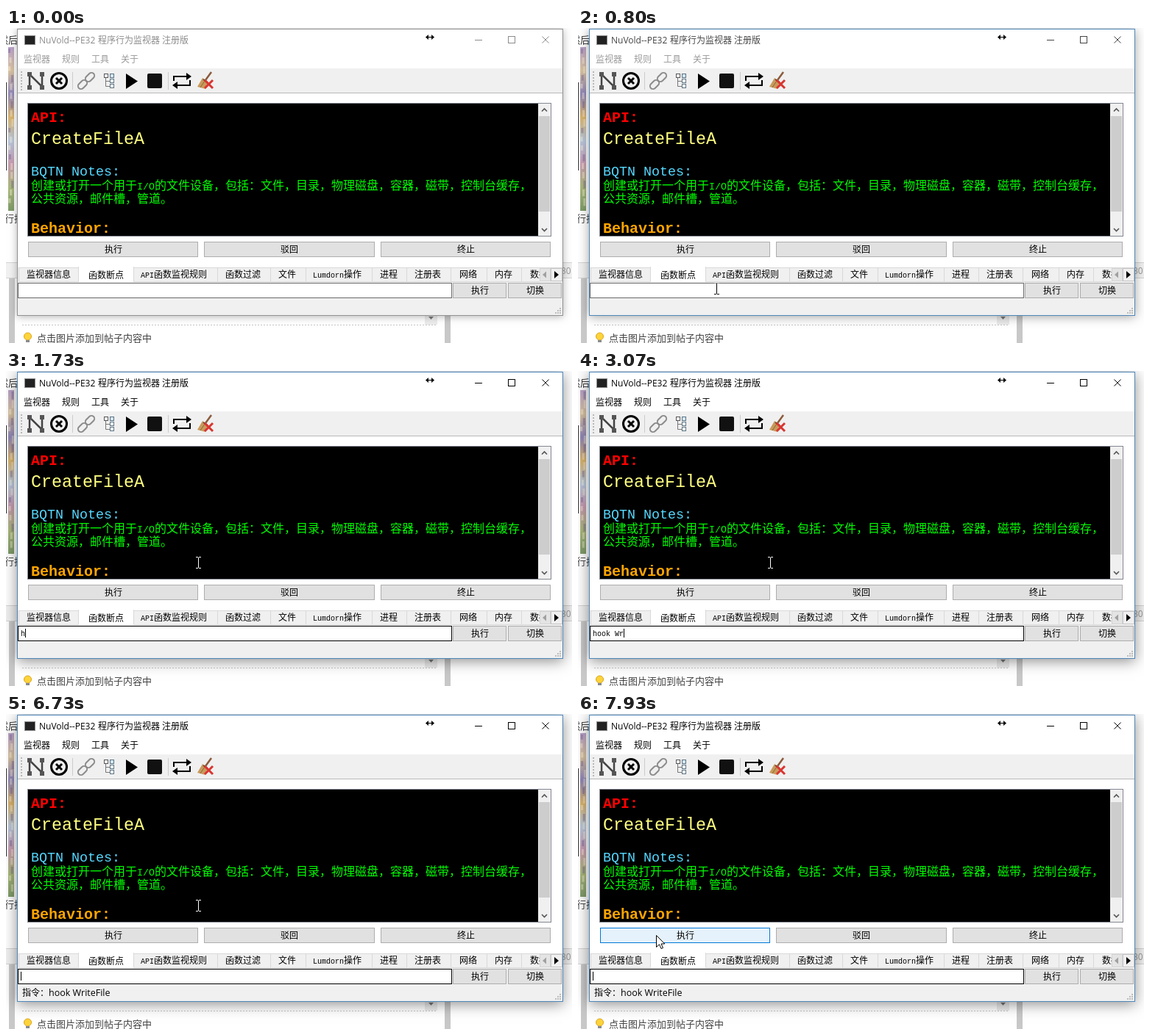
These frames come from a looping animation (769 px wide and 429 px high, 8000 ms). An HTML page with a canvas:

```html
<!DOCTYPE html>
<html lang="zh-CN">
<head>
<meta charset="utf-8">
<style>
html, body { margin: 0; width: 100%; height: 100%; overflow: hidden; background: #fff; }
canvas { display: block; }
</style>
</head>
<body>
<canvas id="stage" width="769" height="429"></canvas>
<script>
const ctx = document.getElementById('stage').getContext('2d');
const LOOP = 8000, STEP = 200 / 3;
const CJK = '"Noto Sans CJK SC", "Noto Sans CJK", sans-serif';
const UI = '"Open Sans", "Noto Sans CJK SC", "Noto Sans CJK", sans-serif';
const MONO = '"Liberation Mono", monospace';

const COMMAND = 'hook WriteFile';
const KEY_TIMES = [1730, 2000, 2130, 2330, 2470, 2870, 3070, 3800, 4070, 4200, 4670, 4870, 5130, 5330];
const ENTER = 5930;
const CARET_OFF = [[0, 1000], [1470, 1730], [3670, 3800], [5930, 6470], [7000, 7530]];
const PICTURE_CHANGES = [670, 800, 930, 4670, 4730, 4800, 6530, 6600, 6670, 7330, 7470, 7600, 7730];

const clamp = v => Math.max(0, Math.min(1, v));
const lerp = (a, b, p) => a + (b - a) * p;
const ease = p => p * p * (3 - 2 * p);
const grey = v => `rgb(${v},${v},${v})`;

function rect(x, y, w, h, color) {
  ctx.fillStyle = color;
  ctx.fillRect(x, y, w, h);
}

function box(x, y, w, h, fill, border) {
  rect(x, y, w, h, border);
  rect(x + 1, y + 1, w - 2, h - 2, fill);
}

function shape(points, fill) {
  ctx.beginPath();
  points.forEach(([x, y]) => ctx.lineTo(x, y));
  ctx.closePath();
  ctx.fillStyle = fill;
  ctx.fill();
}

function line(points, color, width = 1) {
  ctx.beginPath();
  points.forEach(([x, y], i) => i ? ctx.lineTo(x, y) : ctx.moveTo(x, y));
  ctx.strokeStyle = color;
  ctx.lineWidth = width;
  ctx.stroke();
}

function text(s, x, y, color, font = '12px ' + UI) {
  ctx.font = font;
  ctx.fillStyle = color;
  ctx.fillText(s, x, y);
}

// Half-width Latin takes one cell, full-width characters take two.
function cells(s, x, y, cell, color, weight = '') {
  for (const run of s.match(/[\x20-\x7e]+|[^\x20-\x7e]+/g) || []) {
    const latin = run.charCodeAt(0) < 127;
    text(run, x, y, color, `${weight} ${latin ? cell / 0.6 : cell * 2}px ${latin ? MONO : CJK}`);
    x += ctx.measureText(run).width;
  }
}

function button(label, x, y, w, h, hover) {
  box(x, y, w, h, hover ? '#e5f1fb' : '#e1e1e1', hover ? '#0078d7' : '#adadad');
  cells(label, Math.round(x + w / 2 - 12), y + h / 2 + 4.5, 6, '#000');
}

function picture(t) {
  const phase = PICTURE_CHANGES.filter(k => t >= k).length;
  const tones = ['#b9a2c8', '#d8c2a0', '#8f86b8', '#d9b36c', '#b7c7dc', '#c79bb0', '#a9b77a', '#7d9a68'];
  const g = ctx.createLinearGradient(0, 26, 0, 249);
  tones.forEach((c, i) => g.addColorStop(i / 7, c));
  rect(3, 26, 8, 223, g);
  ctx.globalAlpha = 0.4;
  for (let i = 0; i < 18; i++) {
    const r = Math.abs(Math.sin(i * 12.9 + phase * 0.35) * 43.7) % 1;
    rect(3 + r * 5, 28 + i * 12, 3, 6 + r * 5, i % 3 ? '#fff4dc' : '#6d5a95');
  }
  ctx.globalAlpha = 1;
  rect(0, 74, 1, 120, '#333');
}

function page(t) {
  rect(0, 0, 769, 429, '#fff');
  text('然后', -10, 21, '#333', '13px ' + CJK);
  picture(t);
  text('行执', -2, 264, '#444', '13px ' + CJK);
  box(-1, 319, 771, 22, '#f1f1f1', '#d4d4d4');
  text('30', 754, 335, '#999', '12px ' + UI);
  rect(4, 341, 600, 88, '#c8c8c8');
  rect(12, 341, 584, 88, '#fff');
  rect(569, 380, 17, 24, '#ececec');
  shape([[574, 393], [581, 393], [577.5, 397]], '#777');
  for (let x = 22; x < 586; x += 4) rect(x, 404, 2, 1, '#c4c4c4');
  ctx.beginPath();
  ctx.arc(29.5, 420, 5, 0, 7);
  ctx.fillStyle = '#ffd43a';
  ctx.fill();
  ctx.strokeStyle = '#d9a520';
  ctx.lineWidth = 1;
  ctx.stroke();
  rect(27, 425, 5, 3, '#8a8a8a');
  text('点击图片添加到帖子内容中', 42, 427, '#444', '13px ' + CJK);
}

function frame(active) {
  ctx.save();
  ctx.shadowColor = `rgba(0,0,0,${lerp(0.3, 0.45, active)})`;
  ctx.shadowBlur = lerp(10, 18, active);
  ctx.shadowOffsetY = lerp(1, 3, active);
  rect(15, 1, 742, 391, active > 0.5 ? '#4f86b8' : '#929292');
  ctx.restore();
  rect(16, 2, 740, 389, '#fff');
}

function titleBar(t, active) {
  const ink = grey(Math.round(lerp(140, 0, active)));
  box(25, 10, 15, 13, '#222', '#8a8a8a');
  text('NuVold--PE32', 45, 21, ink);
  text('程序行为监视器', 125, 21, ink, '12px ' + CJK);
  text('注册版', 212, 21, ink, '12px ' + CJK);
  rect(637, 16, 10, 1, ink);
  box(682, 11, 10, 10, '#fff', ink);
  line([[728.5, 11.5], [737.5, 20.5]], ink);
  line([[737.5, 11.5], [728.5, 20.5]], ink);

  rect(572, 12, 8, 1, '#000');
  shape([[570, 12.5], [574, 9], [574, 16]], '#000');
  shape([[582, 12.5], [578, 9], [578, 16]], '#000');

  const menuInk = t >= 1000 ? '#000' : '#999';
  [['监视器', 24], ['规则', 76], ['工具', 116], ['关于', 156]]
    .forEach(([s, x]) => text(s, x, 47, menuInk, '12px ' + CJK));
}

function toolBar() {
  rect(16, 55, 740, 34, '#f0f0f0');
  rect(16, 88, 740, 1, '#b8b8b8');
  for (let y = 59; y < 86; y += 4) rect(20, y, 2, 2, '#b8b8b8');
  rect(90, 60, 1, 24, '#ccc');
  rect(220, 60, 1, 24, '#ccc');

  line([[32, 80], [32, 63], [49, 80], [49, 63]], '#444', 2.5);
  [[29, 60], [29, 78], [46, 60], [46, 78]].forEach(([x, y]) => rect(x, y, 6, 6, '#555'));

  ctx.beginPath();
  ctx.arc(72, 72, 10.5, 0, 7);
  ctx.strokeStyle = '#000';
  ctx.lineWidth = 3;
  ctx.stroke();
  line([[68, 68], [76, 76]], '#000', 3);
  line([[76, 68], [68, 76]], '#000', 3);

  for (const d of [-5, 5]) {
    ctx.save();
    ctx.translate(109 + d, 72 - d);
    ctx.rotate(-Math.PI / 4);
    ctx.beginPath();
    ctx.roundRect(-7, -4, 14, 8, 4);
    ctx.strokeStyle = '#8c8c8c';
    ctx.lineWidth = 2;
    ctx.stroke();
    ctx.restore();
  }

  box(133, 62, 6, 6, '#fff', '#555');
  [62, 69, 76].forEach(y => box(141, y, 6, 6, y > 62 ? '#fff' : '#d5e8f5', '#5b7384'));
  line([[135.5, 68], [135.5, 79.5], [141, 79.5]], '#777');
  line([[135.5, 72.5], [141, 72.5]], '#777');

  shape([[163, 62], [179, 72.5], [163, 83]], '#000');
  ctx.beginPath();
  ctx.roundRect(192, 62, 20, 20, 2);
  ctx.fillStyle = '#111';
  ctx.fill();

  line([[228, 72], [228, 66], [246, 66]], '#000', 2);
  shape([[245, 61], [252, 66], [245, 71]], '#000');
  line([[250, 71], [250, 78], [232, 78]], '#000', 2);
  shape([[233, 73], [226, 78], [233, 83]], '#000');

  line([[279, 60], [271, 71]], '#8b5a3c', 2.5);
  shape([[267, 68], [274, 73], [271, 83], [260, 80]], '#c99a5b');
  line([[264, 81], [270, 72]], '#8a6538');
  line([[268, 70], [274, 74]], '#65473a', 2);
  line([[270, 71], [281, 82]], '#d93530', 3);
  line([[281, 71], [270, 82]], '#d93530', 3);
}

function notes() {
  box(29, 102, 712, 182, '#000', '#828790');
  ctx.save();
  ctx.beginPath();
  ctx.rect(30, 103, 693, 180);
  ctx.clip();
  cells('API:', 34, 128, 12, '#f00', 'bold');
  cells('CreateFileA', 34, 158, 14, '#ffff80');
  cells('BQTN Notes:', 34, 201, 11, '#55d8ff');
  cells('创建或打开一个用于I/O的文件设备，包括：文件，目录，物理磁盘，容器，磁带，控制台缓存，', 34, 220, 8, '#0f0');
  cells('公共资源，邮件槽，管道。', 34, 238, 8, '#0f0');
  cells('Behavior:', 34, 279, 12, '#ffa500', 'bold');
  ctx.restore();
  rect(723, 103, 17, 180, '#f0f0f0');
  rect(724, 120, 15, 130, '#cdcdcd');
  line([[728, 113.5], [731.5, 110], [735, 113.5]], '#555', 1.6);
  line([[728, 273], [731.5, 276.5], [735, 273]], '#555', 1.6);
}

function tabs() {
  rect(16, 326, 740, 65, '#f0f0f0');
  rect(17, 326, 739, 1, '#d9d9d9');
  rect(17, 345, 708, 1, '#d9d9d9');
  [17, 287, 359, 407, 497, 544, 604, 653, 700].forEach(x => rect(x, 327, 1, 18, '#d9d9d9'));
  rect(98, 325, 76, 21, '#d9d9d9');
  rect(99, 325, 74, 21, '#fff');
  ctx.save();
  ctx.beginPath();
  ctx.rect(16, 325, 709, 22);
  ctx.clip();
  [['监视器信息', 28], ['API函数监视规则', 183], ['函数过滤', 298], ['文件', 370],
   ['Lumdorn操作', 417], ['进程', 508], ['注册表', 555], ['网络', 616], ['内存', 664], ['数据', 712]]
    .forEach(([s, x]) => cells(s, x, 340, 6, '#000'));
  cells('函数断点', 112, 341, 6, '#000');
  ctx.restore();
  box(725, 327, 15, 18, '#e4e4e4', '#d4d4d4');
  box(740, 327, 16, 18, '#f0f0f0', '#c4c4c4');
  shape([[729, 336], [734, 331.5], [734, 340.5]], '#a0a0a0');
  shape([[751, 336], [745, 331], [745, 341]], '#000');
}

function commandLine(t) {
  box(16, 347, 590, 21, '#fff', t >= 900 ? '#000' : '#6a6a6a');
  button('执行', 607, 347, 73, 21);
  button('切换', 682, 347, 73, 21);
  const typed = t >= ENTER ? '' : COMMAND.slice(0, KEY_TIMES.filter(k => t >= k).length);
  cells(typed, 20, 361, 6, '#000');
  if (!CARET_OFF.some(([a, b]) => t >= a && t < b)) rect(20 + typed.length * 6, 351, 1, 12, '#000');

  if (t >= ENTER) {
    text('指令：', 22, 384, '#000', '12px ' + CJK);
    text(COMMAND, 58, 384, '#000', '12.5px ' + UI);
  }
  for (let i = 0; i < 3; i++)
    for (let j = 0; j <= i; j++) rect(752 - j * 3, 381 + i * 3, 2, 2, '#bdbdbd');
}

function pointerAt(t) {
  const at = Math.floor((t + 4) / STEP) * STEP;
  if (t < 270) return null;
  if (t < 1200) {
    const p = ease(clamp((at - 200) / 400));
    return [lerp(196, 188, p), lerp(383, 355, p)];
  }
  if (t < 1270) return [228, 302];
  const p = ease(clamp((at - 7266) / 667));
  return [lerp(261, 106, p), lerp(261, 301, p)];
}

function pointer([px, py]) {
  const x = Math.round(px), y = Math.round(py);
  const overText = (y > 102 && y < 284) || (y >= 347 && y < 368);
  ctx.save();
  ctx.translate(x, y);
  if (overText) {
    ctx.globalCompositeOperation = 'difference';
    [-8, 7].forEach(v => { rect(-3, v, 3, 1, '#fff'); rect(1, v, 3, 1, '#fff'); });
    rect(0, -7, 1, 14, '#fff');
  } else {
    const arrow = [[0.5, 0.5], [0.5, 16.5], [4.5, 12.8], [7, 18.5], [9.5, 17.5], [7, 12], [11.8, 12]];
    shape(arrow, '#fff');
    line([...arrow, arrow[0]], '#000');
  }
  ctx.restore();
}

function draw(t) {
  const active = clamp((t - 670) / 260);
  const at = pointerAt(t);
  const hover = at && t > 7000 && at[1] >= 291 && at[0] < 261;
  page(t);
  frame(active);
  titleBar(t, active);
  toolBar();
  notes();
  button('执行', 30, 291, 231, 21, hover);
  button('驳回', 269, 291, 232, 21);
  button('终止', 509, 291, 231, 21);
  tabs();
  commandLine(t);
  if (at) pointer(at);
}

const start = performance.now();
function tick() {
  draw((performance.now() - start) % LOOP);
  requestAnimationFrame(tick);
}
tick();
</script>
</body>
</html>
```
